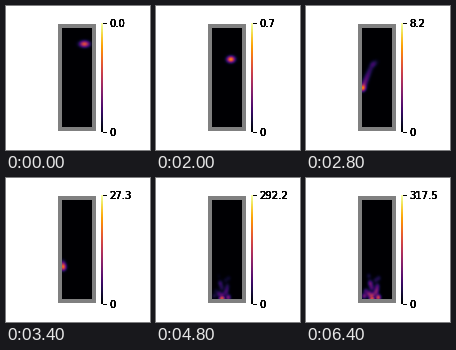
Write a matplotlib script that moves like this. It is 144 px wide and 144 px high and loops after 8000 ms.

```python
import math

import matplotlib.pyplot as plt
import numpy as np
from matplotlib.animation import FuncAnimation
from matplotlib.patches import Rectangle

SIZE, DPI = 144, 72
STEP_MS, FRAMES = 200, 40
LEFT, RIGHT, TOP, BOTTOM = 56, 86, 22, 121
LANDING = 16          # step at which the hot spot reaches the floor
TRAIL = 4             # length of the wake, in steps
INK_LAYERS = 8        # repeated drawing hardens the edges of the digits

plt.rcParams.update({"font.family": "DejaVu Sans", "font.size": 10})

# Way of the hot spot: step, x, y
PATH = np.array([
    (0, 78.5, 38), (1.5, 81, 45), (3, 77, 53), (6, 74, 53.5), (8, 66, 59),
    (9.5, 57, 81), (10, 56.5, 83), (14, 57.5, 93), (LANDING, 66, 120.5),
]).T

# Highest value on the scale: step, value
PEAKS = np.array([(6, 0.7), (10, 8.2), (16, 90.8), (20, 292.2), (23, 317.5)]).T

# Embers piled up around the landing point, the left ones settling last
rng = np.random.default_rng(4)
EMBERS = 16
rise = np.linspace(0, 1, EMBERS) ** 1.5
ember_x = 65 + rng.uniform(-8, 8, EMBERS)
ember_y = 120 - 22 * rise
ember_heat = (0.34 - 0.24 * rise) * rng.uniform(0.6, 1, EMBERS)
ember_end = np.where(ember_x < 63, 28, 23)

gx, gy = np.meshgrid(np.arange(LEFT, RIGHT) + .5, np.arange(TOP, BOTTOM) + .5)


def step_at(frame):
    """Five steps, a pause, then steady steps until the field settles."""
    return min(frame, 5) if frame < 10 else min(frame - 4, 28)


def spot(x, y, w, h):
    return np.exp(-((gx - x) / w) ** 2 / 2 - ((gy - y) / h) ** 2 / 2)


def plume(step):
    """Sum of fading spots along the last part of the path."""
    width = np.interp(step, [0, 10], [3.4, 2.1])
    total = np.zeros_like(gx)
    for lag in np.linspace(0, TRAIL, 33):
        x, y = (np.interp(step - lag, PATH[0], row) for row in PATH[1:])
        total += (1 - lag / TRAIL) ** 2 * spot(x, y, width, 2.2)
    strength = 0.57 + 0.15 * math.sin(math.pi * min(step / LANDING, 1))
    return strength * total / total.max()


def embers(step):
    total = np.zeros_like(gx)
    for x, y, heat_, end in zip(ember_x, ember_y, ember_heat, ember_end):
        grown = np.clip((step - LANDING) / (end - LANDING), 0, 1)
        total += grown * heat_ * spot(x, y, 1.8, 2)
    return total


def field(step):
    return np.maximum(plume(step), embers(step))


def peak(step):
    if step < PEAKS[0, 0]:
        return step * PEAKS[1, 0] / PEAKS[0, 0]
    return math.exp(np.interp(step, PEAKS[0], np.log(PEAKS[1])))


fig = plt.figure(figsize=(SIZE / DPI, SIZE / DPI), dpi=DPI, facecolor="white")
ax = fig.add_axes([0, 0, 1, 1])
ax.axis("off")


def box(x0, y0, x1, y1, color):
    ax.add_patch(Rectangle((x0, y0), x1 - x0, y1 - y0, color=color,
                           linewidth=0, antialiased=False))


def heat(values, x0, y0, x1, y1):
    return ax.imshow(values, cmap="inferno", vmin=0, vmax=1, aspect="auto",
                     interpolation="nearest", extent=(x0, x1, y1, y0), zorder=2)


def tick(y, text):
    box(97, y, 101, y + 1, "black")
    return [ax.text(103.5, y + 4, text, va="baseline") for _ in range(INK_LAYERS)]


box(52, 18, 90, 125, "#808080")
image = heat(field(0), LEFT, TOP, RIGHT, BOTTOM)
heat(np.linspace(1, 0, 109)[:, None], 95, 17, 97, 126)
labels = tick(17, "")
tick(126, "0")
ax.set(xlim=(0, SIZE), ylim=(SIZE, 0))


def update(frame):
    step = step_at(frame)
    image.set_data(field(step))
    for label in labels:
        label.set_text(f"{peak(step):.1f}")
    return image, *labels


anim = FuncAnimation(fig, update, frames=FRAMES, interval=STEP_MS,
                     repeat=True, repeat_delay=0)
plt.show()
```
